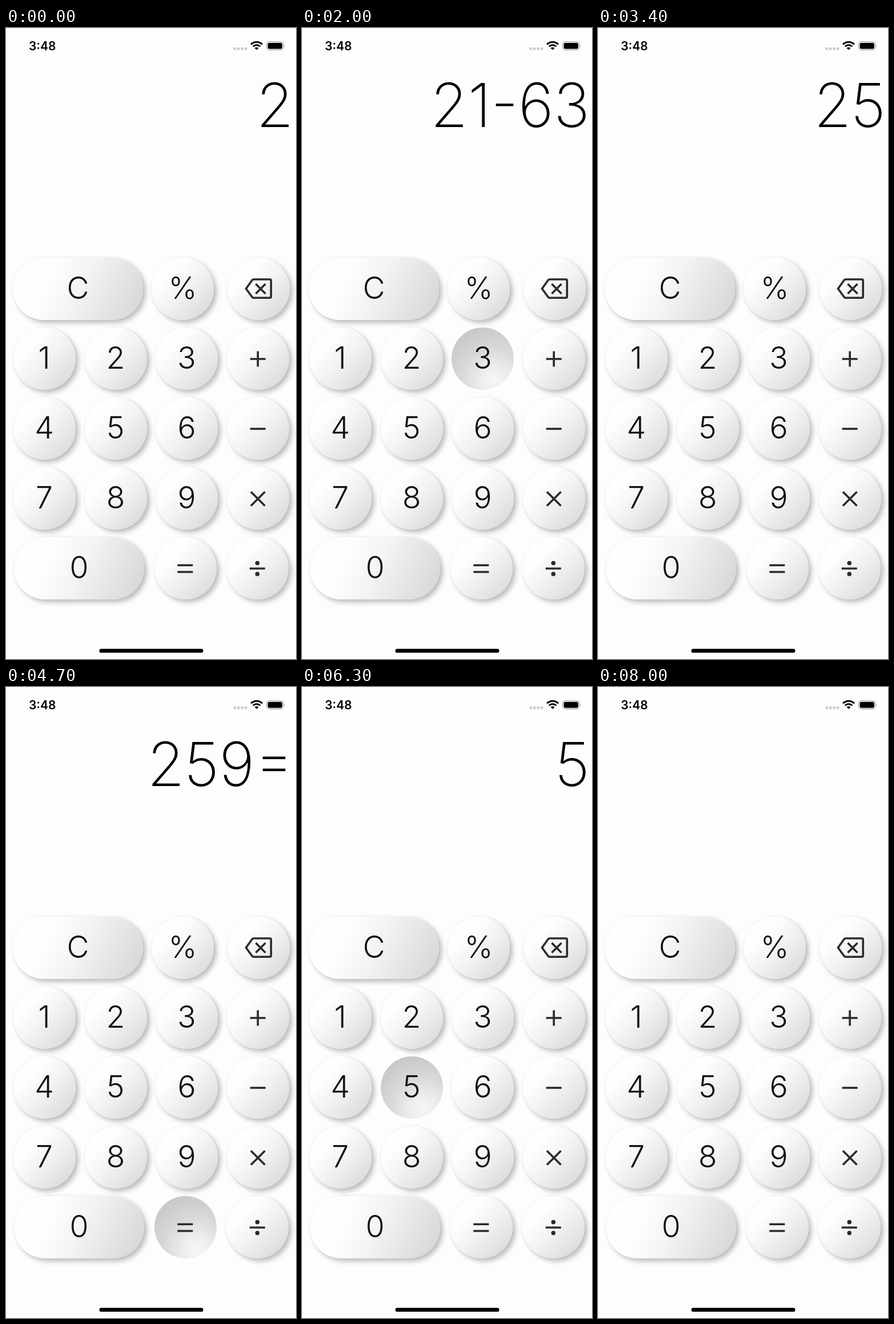
Write an HTML page that moves like this. It is 508 px wide and 1102 px high and loops after 9000 ms.

```html
<!DOCTYPE html>
<html lang="en">
<head>
<meta charset="utf-8">
<title>Calculator</title>
<style>
  html, body { margin: 0; width: 100%; height: 100%; overflow: hidden; background: #fefcff; }
  #stage { position: relative; width: 508px; height: 1102px; overflow: hidden; }
  .key {
    position: absolute; height: 109px; border-radius: 55px;
    background: linear-gradient(var(--angle), #fefdff 28%, #f3f2f4 52%, #d8d7d9 94%);
    box-shadow: 5px 5px 9px rgba(0, 0, 0, .25), 0 0 5px rgba(0, 0, 0, .05);
  }
  .key.pressed {
    background: radial-gradient(circle at 68% 85%, #f6f5f8, #efeef1 20px, #d8d7da 58px, #c8c7ca 95px);
    box-shadow: none;
  }
  svg { position: absolute; left: 0; top: 0; }
  text { font-family: Inter, sans-serif; font-optical-sizing: none; }
  #labels text { font-size: 53.5px; font-weight: 300; text-anchor: middle; fill: #111013; }
  #display { font-size: 106.5px; font-weight: 200; text-anchor: end; }
  #clock { font-size: 21px; font-weight: 600; }
  #icons { fill: none; stroke: #2b2a2d; stroke-width: 3.6; }
</style>
</head>
<body>
<div id="stage">
  <svg width="508" height="1102">
    <text id="clock" x="40" y="38.5">3:48</text>
    <path d="M398.5 36.3H422.5" stroke="#c8c7ca" stroke-width="4.4" stroke-dasharray="4.4 2.1"/>
    <g fill="none" stroke="#000" stroke-width="3">
      <path d="M429.1 28.6A14 14 0 0 1 448.9 28.6M432.8 32.3A8.8 8.8 0 0 1 445.2 32.3"/>
      <path d="M439 38.5L435.6 35.1A4.8 4.8 0 0 1 442.4 35.1Z" fill="#000" stroke="none"/>
    </g>
    <rect x="456.6" y="24.1" width="29.3" height="14.3" rx="4.4" fill="none" stroke="#a3a2a5" stroke-width="1.2"/>
    <rect x="458.6" y="26.1" width="25.3" height="10.3" rx="2.6"/>
    <path d="M487.3 28.8Q489.3 31.2 487.3 33.8Z" fill="#a3a2a5"/>
    <text id="display" x="504" y="173"></text>
    <rect x="163.5" y="1084.3" width="182" height="6.8" rx="3.4"/>
  </svg>
  <div id="keys"></div>
  <svg width="508" height="1102">
    <g id="labels"></g>
    <g id="icons">
      <path d="M434 439H462Q464.3 439 464.3 441.3V469Q464.3 471.3 462 471.3H434Q432 471.3 431 469.8L420.5 455.2L431 440.5Q432 439 434 439Z"/>
      <path d="M437.5 447L454.5 464M454.5 447L437.5 464"/>
      <path d="M427.7 578H454.7M441.2 564.5V591.5"/>
      <path d="M427.7 700H454.7"/>
      <path d="M429 810L453.6 834.6M453.6 810L429 834.6"/>
      <path d="M426.8 944H453.8M300.3 938.2H327.3M300.3 950H327.3"/>
      <g fill="#2b2a2d" stroke="none">
        <circle cx="440.3" cy="934.5" r="3.8"/>
        <circle cx="440.3" cy="953.6" r="3.8"/>
      </g>
    </g>
  </svg>
</div>
<script>
const LOOP = 9000, PRESS = 100, ROUND = 109, WIDE = 228;
const rows = [
  [["C", 12, WIDE], ["%", 255], ["back", 388]],
  [["1", 12.5], ["2", 137.5], ["3", 262], ["+", 387]],
  [["4", 12.5], ["5", 137.5], ["6", 262], ["-", 387]],
  [["7", 12.5], ["8", 137.5], ["9", 262], ["×", 387]],
  [["0", 14, WIDE], ["=", 259.5], ["÷", 386]]
];

// [time, key, delay until the key looks pressed]; null means it never does
const taps = [
  [0, "2", null], [300, "1", 100], [1400, "-", 0], [1600, "6", 100], [2000, "3", 0],
  [2500, "C", 0], [2900, "2", 100], [3300, "5", 0], [3600, "9", 0], [4700, "=", 0],
  [5000, "=", 0], [5300, "9", 100], [5900, "C", null], [6300, "5", 0], [6700, "4", 0],
  [7000, "1", 0], [7500, "3", 100], [7900, "C", 0]
];

const $ = id => document.getElementById(id);
const keys = {};

rows.forEach((row, r) => row.forEach(([name, x, width = ROUND]) => {
  const key = document.createElement("div");
  const angle = 90 + Math.atan2(ROUND, width) * 180 / Math.PI;
  key.className = "key";
  key.style.cssText = `left:${x}px;top:${401 + r * 122}px;width:${width}px;--angle:${angle}deg`;
  $("keys").append(key);
  keys[name] = key;
  if (/^[\dC%]$/.test(name)) {
    const label = document.createElementNS("http://www.w3.org/2000/svg", "text");
    label.setAttribute("x", x + width / 2);
    label.setAttribute("y", 472.5 + r * 122);
    label.textContent = name;
    $("labels").append(label);
  }
}));

function draw(now) {
  const t = now % LOOP;
  let shown = "", pressed = null;
  for (const [time, name, delay] of taps) {
    if (t < time) break;
    shown = name === "C" ? "" : shown + name;
    const held = t - time - delay;
    if (delay !== null && held >= 0 && held < PRESS) pressed = name;
  }
  $("display").textContent = shown;
  for (const name in keys) keys[name].classList.toggle("pressed", name === pressed);
}

const start = performance.now();
function tick() {
  draw(performance.now() - start);
  requestAnimationFrame(tick);
}
tick();
</script>
</body>
</html>
```
